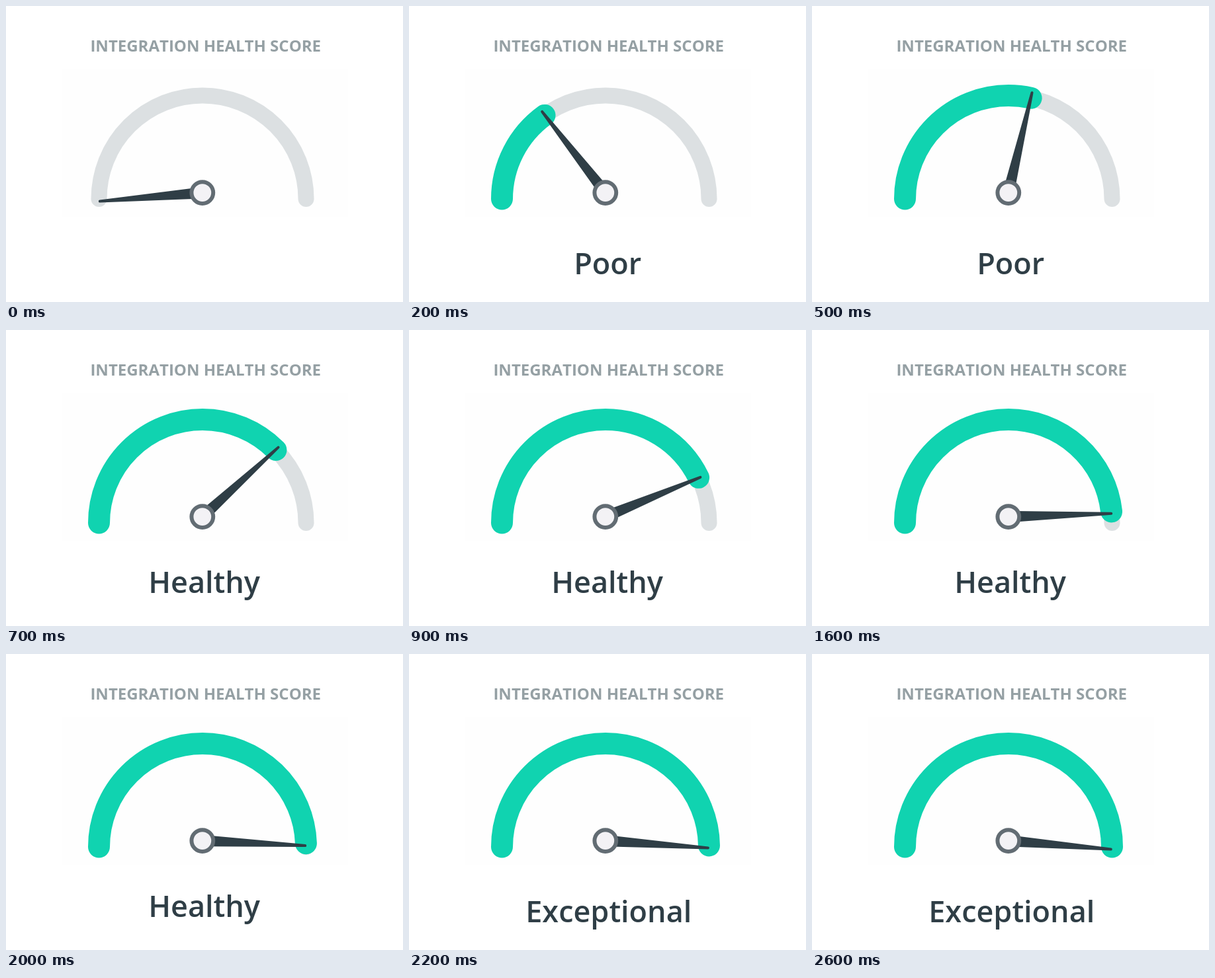
An HTML page with a canvas that plays this animation: 600 by 448 pixels, repeating every 2.7 s.

```html
<!DOCTYPE html>
<html lang="en">
<head>
<meta charset="utf-8">
<title>Integration health score</title>
<style>
  html, body { margin: 0; width: 100%; height: 100%; overflow: hidden; background: #fff; }
  canvas { display: block; width: 600px; height: 448px; }
</style>
</head>
<body>
<canvas id="stage" width="600" height="448"></canvas>
<script>
const ctx = document.getElementById('stage').getContext('2d');
const LOOP = 2700, STEP = 100;
const PAUSES = [3, 14, 25];               // ticks on which the gauge stands still
const ARC = { x: 297, y: 292, r: 156.5 };
const HUB = { x: 296.8, y: 282.6 };
const TILT = 4.8 * Math.PI / 180;         // needle rests this far below level
const DARK = '#2f3e46';

// Share of the sweep still to go, by step; decays exponentially between points.
const LEFT = [[0, 1], [1, 0.86], [2, 0.7], [4, 0.43], [8, 0.1445], [12, 0.059],
  [14, 0.0348], [18, 0.0108], [23, 0.001]];

function progress(step) {
  if (step >= 23) return 1;
  const i = LEFT.findIndex(p => p[0] > step);
  const [k0, v0] = LEFT[i - 1], [k1, v1] = LEFT[i];
  return 1 - v0 * Math.pow(v1 / v0, (step - k0) / (k1 - k0));
}

function band(share, width, color) {
  ctx.beginPath();
  ctx.arc(ARC.x, ARC.y, ARC.r, Math.PI, Math.PI * (1 + share));
  ctx.lineWidth = width;
  ctx.lineCap = 'round';
  ctx.strokeStyle = color;
  ctx.stroke();
}

function needle(share) {
  ctx.save();
  ctx.translate(HUB.x, HUB.y);
  ctx.rotate(Math.PI - TILT + share * (Math.PI + 2 * TILT));
  ctx.beginPath();
  ctx.moveTo(10, -8.3);
  ctx.lineTo(155.5, -2);
  ctx.arc(155.5, 0, 2, -Math.PI / 2, Math.PI / 2);
  ctx.lineTo(10, 8.3);
  ctx.closePath();
  ctx.fillStyle = DARK;
  ctx.fill();
  ctx.restore();
}

function hub() {
  ctx.beginPath();
  ctx.arc(HUB.x, HUB.y, 16.4, 0, 2 * Math.PI);
  ctx.fillStyle = '#f3f2f5';
  ctx.fill();
  ctx.lineWidth = 6;
  ctx.strokeStyle = '#626c73';
  ctx.stroke();
}

function gauge(share) {
  ctx.fillStyle = '#fefefe';
  ctx.fillRect(84, 96, 433, 223);
  ctx.filter = 'blur(0.6px)';             // slightly soft edges
  band(1, 24, '#dce0e2');
  if (share > 0) band(share, 33, '#10d3b0');
  needle(share);
  hub();
  ctx.filter = 'none';
}

// Centres the visible ink of a line, not its advance width.
function label(text, cx, y, font, color) {
  ctx.font = font + ' "Open Sans", "Noto Sans", sans-serif';
  ctx.fontKerning = 'none';
  ctx.textAlign = 'left';
  ctx.textBaseline = 'alphabetic';
  ctx.fillStyle = color;
  const m = ctx.measureText(text);
  ctx.fillText(text, cx - (m.actualBoundingBoxRight - m.actualBoundingBoxLeft) / 2, y);
}

function rating(tick) {
  if (tick < 1) return null;
  if (tick < 7) return ['Poor', 406];
  if (tick < 22) return ['Healthy', 398];
  return ['Exceptional', 406];
}

function draw(ms) {
  const tick = Math.floor((ms % LOOP) / STEP);
  ctx.fillStyle = '#fff';
  ctx.fillRect(0, 0, 600, 448);
  label('INTEGRATION HEALTH SCORE', 302.5, 69, '700 24px', '#95a0a4');
  gauge(progress(tick - PAUSES.filter(p => p <= tick).length));
  const word = rating(tick);
  if (word) label(word[0], 302, word[1], '600 45px', DARK);
}

const start = performance.now();
function loop() {
  draw(performance.now() - start);
  requestAnimationFrame(loop);
}
loop();
</script>
</body>
</html>
```
